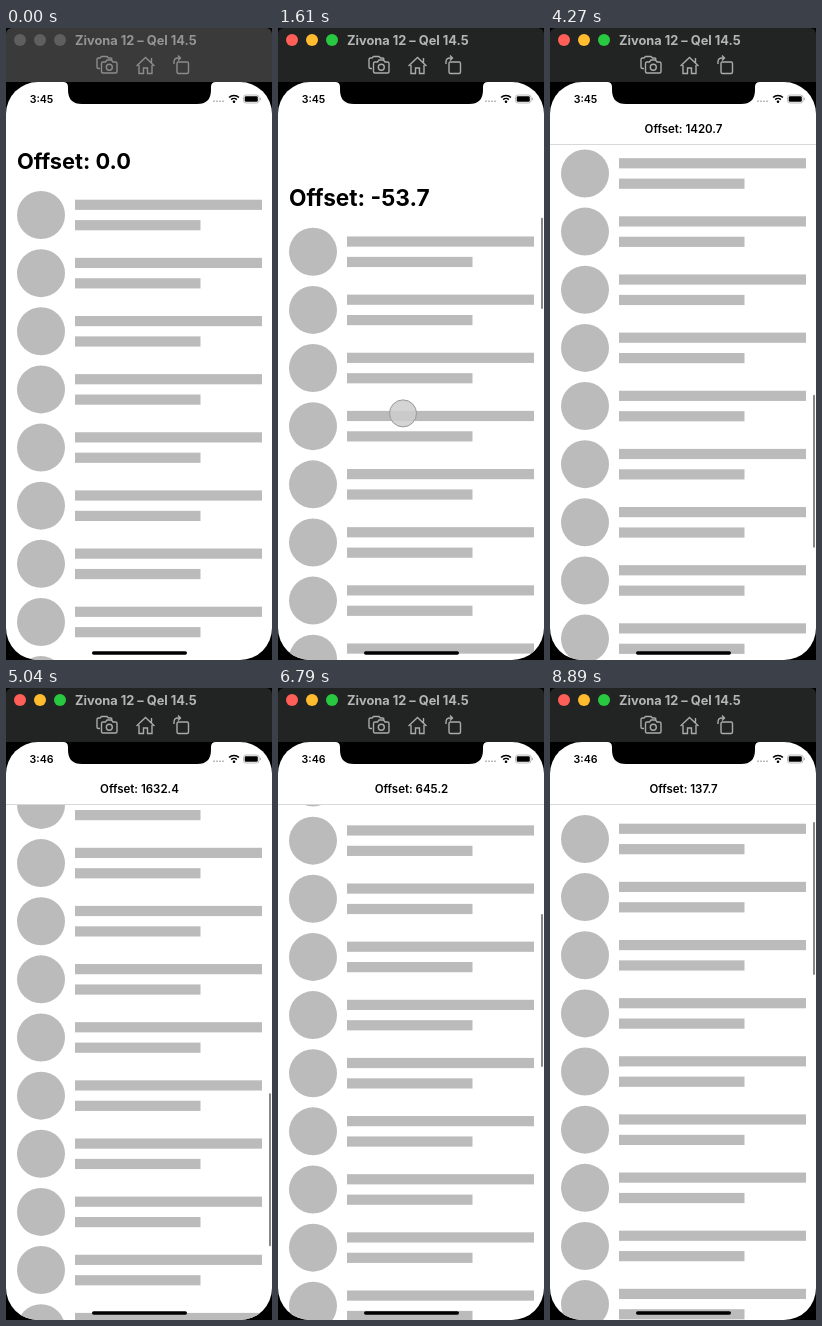
Write an HTML page with a canvas that moves like this. It is 266x632 px and loops after 8960 ms.

```html
<!DOCTYPE html>
<html lang="en">
<head>
<meta charset="utf-8">
<title>Scroll offset</title>
<style>
  html, body { margin: 0; width: 100%; height: 100%; overflow: hidden; background: #000; }
  canvas { display: block; }
</style>
</head>
<body>
<canvas id="stage" width="266" height="632"></canvas>
<script>
const ctx = document.getElementById('stage').getContext('2d');
const LOOP = 8960, STEP = 70;
const SCALE = 0.684;          // pixels per point
const ROW = 85 * SCALE;
const TAU = 499;              // scroll deceleration, ms
const FONT = 'Inter, "Liberation Sans", sans-serif';

const clamp = (v, lo = 0, hi = 1) => Math.min(hi, Math.max(lo, v));
const progress = (t, from, to) => clamp((t - from) / (to - from));
const smooth = u => (1 - Math.cos(Math.PI * u)) / 2;
const mix = (a, b, u) => a + (b - a) * u;
const rubberBand = d => 845 * (1 - 1 / (d * 0.55 / 845 + 1));
const coast = (t, rest, span, at) => rest + span * Math.exp((at - t) / TAU);

// Vertical finger travel of the first slow drag, in points
function firstDrag(t) {
  return t < 1400
    ? mix(0, 119.4, smooth(progress(t, 490, 1400)))
    : mix(119.4, -130.3, smooth(progress(t, 1400, 2730)));
}

function scrollOffset(t) {
  if (t < 3080) {
    const d = firstDrag(t);
    return d > 0 ? -rubberBand(d) : -d;
  }
  if (t < 3430) return mix(130.3, 240, progress(t, 3080, 3430) ** 4);
  if (t < 5740) return coast(t, 1690, -269.3, 4270);
  if (t < 6270) return mix(1676, 1590, progress(t, 6090, 6270) ** 4);
  return coast(t, 130, 95.7, 7630);
}

function touchPoint(t, offset) {
  if (t >= 140 && t < 2800) return [125, 314 + SCALE * firstDrag(t)];
  if (t >= 3080 && t < 3430) return [132, 500 - SCALE * (offset - 130.3)];
  if (t >= 5810 && t < 6270) return [143, 539 - SCALE * (offset - 1676)];
}

function rect(x, y, w, h, color) {
  ctx.fillStyle = color;
  ctx.fillRect(x, y, w, h);
}

function pill(x, y, w, h, r, color) {
  ctx.fillStyle = color;
  ctx.beginPath();
  ctx.roundRect(x, y, w, h, r);
  ctx.fill();
}

function disc(x, y, r, color) {
  ctx.fillStyle = color;
  ctx.beginPath();
  ctx.arc(x, y, r, 0, 7);
  ctx.fill();
}

function text(str, x, y, size, weight, color, align = 'left') {
  ctx.font = `${weight} ${size}px ${FONT}`;
  ctx.textAlign = align;
  ctx.textBaseline = 'alphabetic';
  ctx.fillStyle = color;
  ctx.fillText(str, x, y);
}

function line(path, color, width) {
  ctx.strokeStyle = color;
  ctx.lineWidth = width;
  ctx.stroke(new Path2D(path));
}

const CAMERA = 'M94 40.5H92.5Q91 40.5 91 39V31.5Q91 30 92.5 30H94L95.5 28.5H101L102.5 30H104.5Q106 30 106 31.5' +
  'M97 34H99.5L101 32H105.5L107 34H109.500Q111 34 111 35.500V43.500Q111 45 109.500 45H97Q95.500 45 95.500 43.500V35.500Q95.500 34 97 34Z' +
  'M106.300 39.300A3 3 0 1 1 100.300 39.300A3 3 0 1 1 106.300 39.300';
const HOME = 'M130.500 38L139.500 29.500L148.500 38M145.500 34.500V30M133 37V45.500H137.500V40H141.500V45.500H146V37';
const ROTATE = 'M172.500 34H181Q182.500 34 182.500 35.500V44Q182.500 45.500 181 45.500H172.500Q171 45.500 171 44V35.500Q171 34 172.500 34Z' +
  'M168 36V34Q168 30 172 30H174M172 27.500L174.500 30L172 32.500';

function drawWindowBar(active) {
  pill(0, 0, 266, 60, [6, 6, 0, 0], active ? '#222423' : '#3a3a3a');
  const lights = active ? ['#ff5f57', '#febc2e', '#28c840'] : Array(3).fill('#5f5f5f');
  lights.forEach((color, i) => disc(14 + 20 * i, 12, 6, color));
  text('Zivona 12 – Qel 14.5', 69, 16.5, 12.8, 700, active ? '#b4b5b4' : '#959595');
  for (const icon of [CAMERA, HOME, ROTATE]) line(icon, active ? '#a9aaa9' : '#8c8c8c', 1.4);
}

function drawRows(offset, top) {
  ctx.save();
  ctx.beginPath();
  ctx.rect(0, top, 266, 632 - top);
  ctx.clip();
  const first = Math.max(0, Math.floor((offset * SCALE - 100) / ROW));
  for (let i = first; i < first + 12; i++) {
    const y = 187 + i * ROW - offset * SCALE;
    disc(35, y, 24, '#bbb');
    rect(69, y - 15.3, 187, 10.2, '#bbb');
    rect(69, y + 5.1, 125.5, 10.2, '#bbb');
  }
  ctx.restore();
}

function drawNavBar(offset, label) {
  if (offset < 60) {
    const size = 21.8 * (1 + clamp(-offset / 53.7, 0, 1.2) * 0.04);
    ctx.save();
    ctx.beginPath();
    ctx.rect(0, offset > 0 ? 116 : 86, 266, 546);
    ctx.clip();
    text(label, 11, 141 - offset * SCALE, size, 700, '#000');
    ctx.restore();
  }
  if (offset > 52) rect(0, 116, 266, 1, '#d8d8d8');
  ctx.globalAlpha = clamp((offset - 40) / 10);
  text(label, 133.5, 105.300, 11.5, 600, '#000', 'center');
  ctx.globalAlpha = 1;
}

function drawScrollBar(offset) {
  const top = Math.max(153 - SCALE * offset, 109 + 0.1814 * offset);
  const length = offset < 0 ? 128 + SCALE * offset : 128 + 25 * clamp(offset / 52);
  pill(263, top, 2, length, 1, '#888');
}

function drawStatusBar(t) {
  ctx.fillStyle = '#000';
  ctx.fill(new Path2D('M57 53V54Q62 54 62 59V62Q62 76 76 76H191Q205 76 205 62V59Q205 54 210 54V53Z'));
  text(t < 5000 ? '3:45' : '3:46', 35.5, 75, 10.6, 600, '#000', 'center');
  for (let i = 0; i < 4; i++) rect(207 + 3 * i, 72.5, 2, 1.5, '#bbb');
  ctx.strokeStyle = '#000';
  ctx.lineWidth = 1.6;
  for (const r of [4, 7]) {
    ctx.beginPath();
    ctx.arc(228, 74.5, r, -2.35, -0.79);
    ctx.stroke();
  }
  disc(228, 73.7, 1.3, '#000');
  ctx.strokeStyle = '#aaa';
  ctx.lineWidth = 0.8;
  ctx.beginPath();
  ctx.roundRect(237.5, 67, 15.5, 8, 2.4);
  ctx.stroke();
  pill(238.7, 68.2, 13.1, 5.6, 1.3, '#000');
  rect(253.8, 69.8, 1, 2.4, '#aaa');
}

function draw(t) {
  const offset = scrollOffset(t);
  // The label keeps its last drag value until the next touch
  const shown = t >= 2800 && t < 3080 ? 134.7 : offset;
  const label = 'Offset: ' + (Math.abs(shown) < 0.05 ? 0 : shown).toFixed(1);

  rect(0, 0, 266, 632, '#000');
  drawWindowBar(t >= 140);
  rect(0, 54, 266, 578, '#000');

  ctx.save();
  ctx.beginPath();
  ctx.roundRect(0, 54, 266, 578, 32);
  ctx.clip();
  rect(0, 54, 266, 578, '#fff');
  drawRows(offset, Math.max(116, 152 - SCALE * offset));
  drawNavBar(offset, label);
  if (t >= 490) drawScrollBar(offset);
  drawStatusBar(t);
  pill(86, 623.3, 95, 3.4, 1.7, '#000');
  ctx.restore();

  const touch = touchPoint(t, offset);
  if (touch) {
    disc(...touch, 13.5, 'rgba(205, 205, 205, 0.85)');
    ctx.strokeStyle = '#999';
    ctx.lineWidth = 1;
    ctx.stroke();
  }
}

function tick() {
  const t = performance.now() % LOOP;
  draw(Math.floor(t / STEP) * STEP);
  requestAnimationFrame(tick);
}
tick();
</script>
</body>
</html>
```
